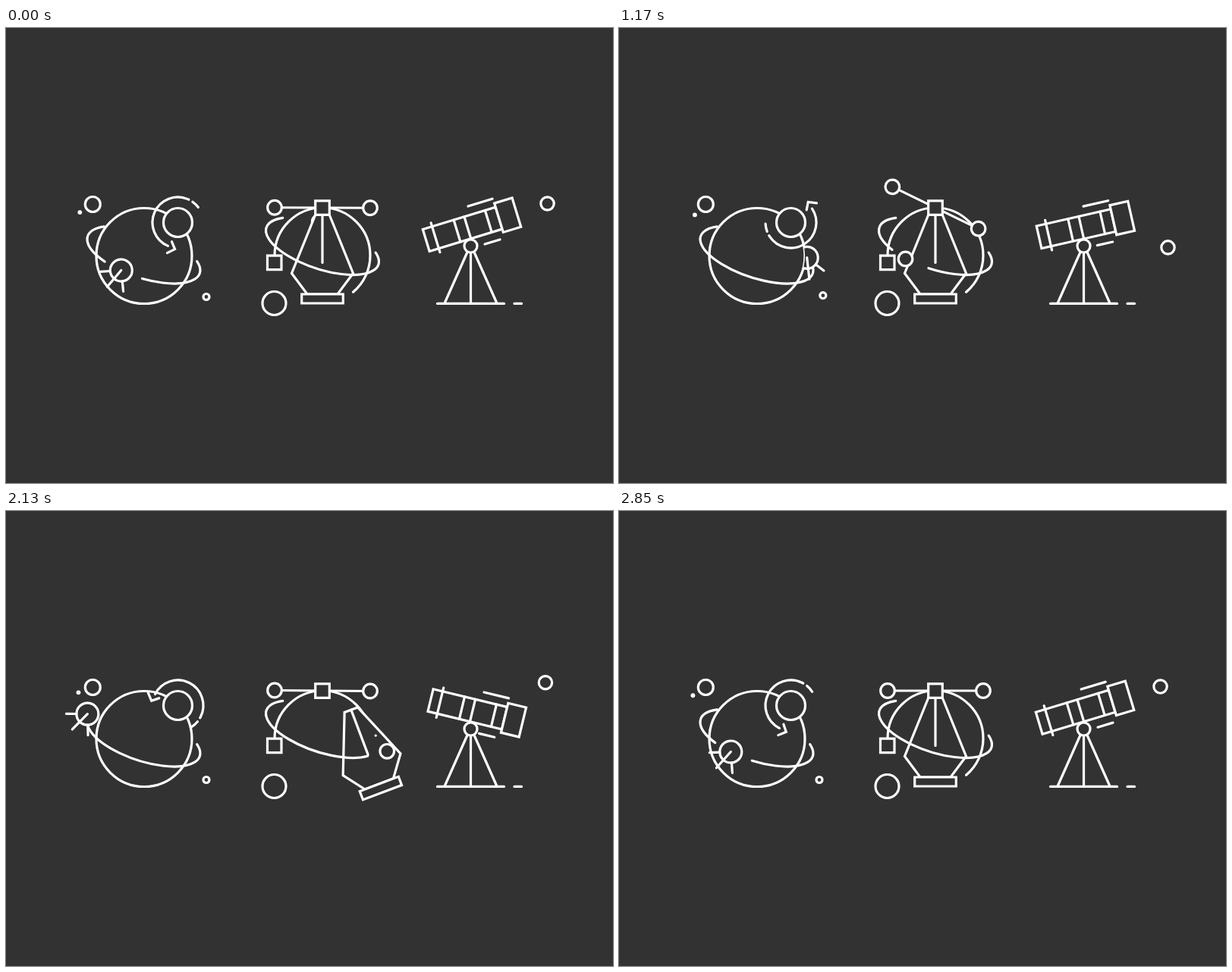
An HTML page with a canvas that plays this animation: 800x600 px, repeating every 2.88 s.

```html
<!DOCTYPE html>
<html lang="en">
<head>
<meta charset="utf-8">
<title>Space icons</title>
<style>
  html, body { margin: 0; height: 100%; overflow: hidden; background: #323232; }
  canvas { display: block; }
</style>
</head>
<body>
<canvas id="stage" width="800" height="600"></canvas>
<script>
const LOOP = 2880, BG = '#323232', INK = '#fff';
const TILT = 18.3, RING_A = 77.8, RING_B = 30.6, RING_FROM = -27, RING_TO = 218;
const c = document.getElementById('stage').getContext('2d');
const rad = d => d * Math.PI / 180;
const sin = d => Math.sin(rad(d)), cos = d => Math.cos(rad(d));

// Easing: all run from 0 to 1
const span = (t, a, b) => Math.min(1, Math.max(0, (t - a) / (b - a)));
const smooth = p => p * p * (3 - 2 * p);
const ramp = (t, a, b) => smooth(span(t, a, b));
const hold = (t, a, b, d, e) => ramp(t, a, b) - ramp(t, d, e);
function spring(t, start) {
  const s = Math.max(0, t - start) / 1000;
  return 1 - Math.exp(-9 * s) * Math.cos(14 * s);
}

function trace(p) {
  c.beginPath();
  for (let i = 0; i < p.length; i += 2) c.lineTo(p[i], p[i + 1]);
}

function line(...p) {
  trace(p);
  c.stroke();
}

function shape(...p) {
  trace(p);
  c.closePath();
  c.fill();
  c.stroke();
}

const box = (x0, y0, x1, y1) => shape(x0, y0, x1, y0, x1, y1, x0, y1);

function arc(x, y, r, from, to) {
  c.beginPath();
  c.arc(x, y, r, rad(from), rad(to));
  c.stroke();
}

function disc(x, y, r) {
  c.beginPath();
  c.arc(x, y, r, 0, 7);
  c.fill();
  c.stroke();
}

// Run draw with the origin at x, y, turned by deg
function at(x, y, deg, draw) {
  c.save();
  c.translate(x, y);
  c.rotate(rad(deg));
  draw();
  c.restore();
}

function onOrbit(x, y, a, b, u) {
  const p = a * cos(u), q = b * sin(u);
  return [x + p * cos(TILT) - q * sin(TILT), y + p * sin(TILT) + q * cos(TILT)];
}

// Planet ring, open at the back and around the body at angle u
function ring(x, y, u) {
  const low = (RING_FROM + RING_TO) / 2 - 180;
  const mid = ((u - low) % 360 + 360) % 360 + low;
  const half = 20.5 + 7.5 * cos(u) ** 2;
  const part = (from, to) => {
    if (from >= to) return;
    c.beginPath();
    c.ellipse(x, y, RING_A, RING_B, rad(TILT), rad(from), rad(to));
    c.stroke();
  };
  part(RING_FROM, Math.min(RING_TO, mid - half));
  part(Math.max(RING_FROM, mid + half), RING_TO);
}

function lander(x, y, deg) {
  at(x, y, deg, () => {
    disc(0, 0, 14.5);
    line(0, 0, 28.5, 0);
    for (const side of [-46, 46]) {
      line(14.5 * cos(side), 14.5 * sin(side), 28 * cos(side), 28 * sin(side));
    }
  });
}

function planet(t, phase) {
  const u = 105.2 - phase + 3.5 * sin(phase);
  const [x, y] = onOrbit(181, 300, 83, 28.7, u);
  const heading = 112 + 30 * cos((t - 2460) / 8);

  ring(181.5, 299, u);
  disc(114.3, 232.5, 10);
  const d = 148 - 12 * ramp(t, 0, 280) + 372 * smooth(span(t, 1850, 2865) ** 1.45);
  c.fillStyle = INK;
  c.beginPath();
  c.arc(114.3 + 20 * cos(d), 232.5 + 20 * sin(d), 2.9, 0, 7);
  c.fill();
  c.fillStyle = BG;

  const kick = sin(180 * span(t, 560, 1260)) ** 2;
  disc(264 + 32 * kick, 354.5 - 12.2 * kick, 4);

  c.save();
  c.beginPath();
  c.arc(182, 300.5, 63, 0, 7);
  c.stroke();
  if (sin(u) < 0) {
    // Behind the planet
    c.rect(0, 0, 800, 600);
    c.clip('evenodd');
  }
  lander(x, y, heading);
  c.restore();

  disc(226.5, 256.5, 19);
  at(226.5, 256.5, -phase, () => {
    arc(0, 0, 33.5, 113, 295.5);
    arc(0, 0, 33.5, -54.5, -36.5);
    c.rotate(rad(108.75));
    line(26.5, -0.5, 34.5, -7.5, 42.5, 0.5);
  });
}

function penNib(t) {
  const swing = 45 * hold(t, 1365, 1800, 2200, 2600);
  const lean = hold(t, 1400, 1800, 2200, 2770);
  const r = 53.5 - 7 * sin(180 * lean);
  at(417 + r * sin(swing), 300 - r * cos(swing), -20.7 * lean, () => {
    shape(-9.3, 0, 9.3, 0, 40.5, 77, 20, 104.5, -20, 104.5, -40.5, 77);
    line(0, 0, 0, 63);
    box(-27.3, 104.5, 27.3, 116.5);
  });
}

function drawing(t, phase) {
  const u = 261 - phase - 6.5 * sin(phase);
  const [x, y] = onOrbit(417, 288, 90, 30, u);
  const front = sin(u) > -0.1;

  disc(353.5, 363, 15.5);
  arc(417, 300, 63, 180, 410);
  if (!front) disc(x, y, 9.3);
  penNib(t);
  ring(417, 287.5, u);
  if (front) disc(x, y, 9.3);

  at(417, 237, 26 * (spring(t, 0) - spring(t, 1680)), () => {
    line(-63, 0, 63, 0);
    disc(-63, 0, 9.3);
    disc(63, 0, 9.3);
  });
  box(407.7, 227.8, 426.3, 246.4);
  box(344.5, 300.2, 363, 318.6);
}

function telescope(t) {
  const turn = hold(t, 1080, 1470, 2470, 2870);
  const pull = 14.5 * hold(t, 30, 290, 480, 780);

  const drop = spring(t, 360) - spring(t, 1995);
  const angle = 30 * drop - 29, r = 115.5 - 4.5 * drop;
  disc(612.5 + r * cos(angle), 287.5 + r * sin(angle), 8.7);

  at(612.5, 287.5, 30.6 * turn - 17, () => {
    c.translate(-6.4 * turn, 0);
    box(-54, -39.5, 46.3 - pull, -9.3);
    for (const x of [-11.4, 3.1, 31.8 - pull * 0.93]) line(x, -39.5, x, -9.3);
    line(-41.2, -44.5, -41.2, -4);
    box(46.3 - pull, -44.8, 70.7 - pull, -4.8);
    line(12, -51.2, 45.5 - pull * 0.82, -51.2);
    line(18.4, 3.1, 39.3 - pull, 3.1);
  });

  for (const side of [-1, 0, 1]) line(612.5 + side * 3.8, 294, 612.5 + side * 34.5, 363);
  disc(612.5, 287.5, 8.5);
  line(568.5, 363.4, 656.5, 363.4);
  line(670, 363.4, 679.5, 363.4);
}

function frame(now) {
  const t = now % LOOP, phase = t / LOOP * 360;
  c.fillStyle = BG;
  c.fillRect(0, 0, 800, 600);
  c.strokeStyle = INK;
  c.lineWidth = 3.2;
  c.lineCap = 'round';
  planet(t, phase);
  drawing(t, phase);
  telescope(t);
}

const start = performance.now();
function tick() {
  frame(performance.now() - start);
  requestAnimationFrame(tick);
}
tick();
</script>
</body>
</html>
```
